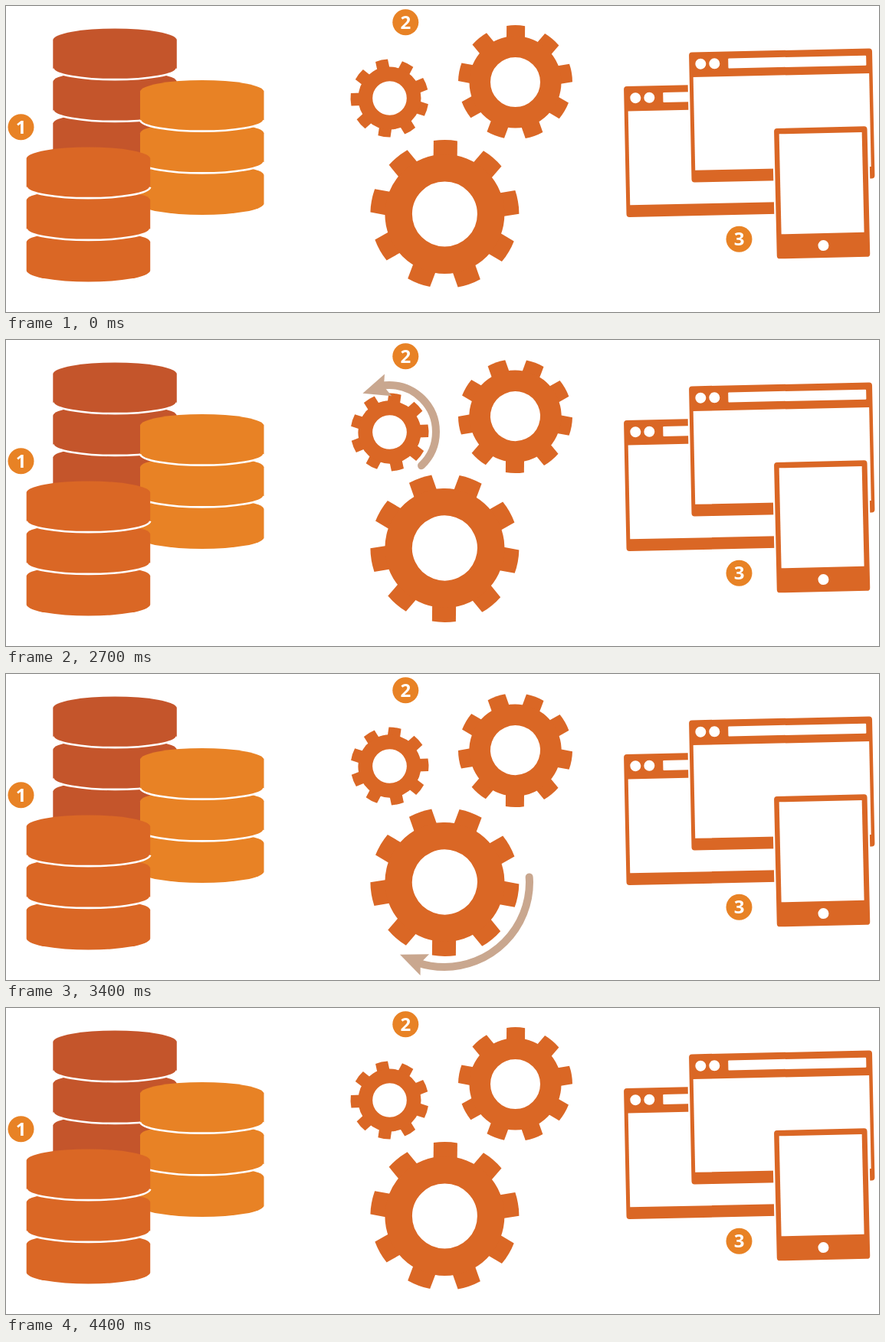
An HTML page for the animation above (5400 ms loop, 1139 px wide and 400 px high).

```html
<!DOCTYPE html>
<html lang="en">
<head>
<meta charset="utf-8">
<title>Data to screens</title>
<style>
  html, body { margin: 0; width: 100%; height: 100%; overflow: hidden; background: #fff; }
  svg { display: block; width: 100%; height: 100%; }
  text { font: bold 24px "Open Sans", "Noto Sans", sans-serif; fill: #fff; text-anchor: middle; }
  .card { stroke: #fff; stroke-width: 4.5; paint-order: stroke; }
</style>
</head>
<body>
<svg id="stage" viewBox="0 0 1139 400"></svg>
<script>
const DARK = '#c4552b', MID = '#da6725', LIGHT = '#e88225', TAN = '#c9a78f';
const LOOP = 5400, START = 2000, STEP = 100, STEPS = 24;
const stage = document.getElementById('stage');

// Three discs, drawn from the bottom up so that each covers the next one's top.
function stack(x, y, color) {
  const disc = i => {
    const top = y + i * 54.7, bottom = top + 37.7;
    const rim = `A80.8 15 0 0 0 ${x + 161.5} ${bottom}`;
    return `<path fill="${color}" d="M${x} ${top}V${bottom}${rim}V${top}A80.8 15 0 0 0 ${x} ${top}Z"/>` +
      (i < 2 ? `<path fill="none" stroke="#fff" stroke-width="2.6" d="M${x} ${bottom}${rim}"/>` : '');
  };
  return [2, 1, 0].map(disc).join('');
}

// Nine straight-sided teeth on a ring.
function gear({ x, y, hole, body, outer, tooth, turn }) {
  const half = tooth / 2, reach = Math.sqrt(outer * outer - half * half);
  const cog = `M${-half} ${-body + 5}V${-reach}A${outer} ${outer} 0 0 1 ${half} ${-reach}V${-body + 5}Z`;
  let teeth = '';
  for (let i = 0; i < 9; i++) teeth += `<path d="${cog}" transform="rotate(${turn + i * 40})"/>`;
  return `<g transform="translate(${x} ${y})"><g class="gear" fill="${MID}">${teeth}` +
    `<circle r="${(hole + body) / 2}" fill="none" stroke="${MID}" stroke-width="${body - hole}"/></g></g>`;
}

const box = (x, y, w, h, r, fill, cls = '') =>
  `<rect class="${cls}" x="${x}" y="${y}" width="${w}" height="${h}" rx="${r}" fill="${fill}"/>`;
const dot = (x, y, r, fill) => `<circle cx="${x}" cy="${y}" r="${r}" fill="${fill}"/>`;
const badge = (x, y, label) => dot(x, y, 17, LIGHT) + `<text x="${x}" y="${y + 8.7}">${label}</text>`;

const browser = (x, y, h) => `<g transform="translate(${x} ${y}) rotate(-1.2)">` +
  box(0, 0, 239, h, 4, MID, 'card') + box(5, 32.5, 229.5, h - 48, 0, '#fff') +
  dot(15, 15.5, 7, '#fff') + dot(33, 15.5, 7, '#fff') + box(51, 9, 180, 13, 1, '#fff') + '</g>';

const tablet = (x, y) => `<g transform="translate(${x} ${y}) rotate(-1.3)">` +
  box(0, 0, 121.5, 170.5, 4, MID, 'card') + box(6.5, 7.5, 108, 131, 0, '#fff') +
  dot(61, 154.5, 7, '#fff') + '</g>';

// The route loops round the small gear, then the big one, and leaves to the right.
const ROUTE = 'M153 181H500A61 61 0 0 0 500 59A61 61 0 0 0 500 181A61 61 0 0 0 525.4 174' +
  'A111 111 0 0 1 683 272A111 111 0 0 1 572 383A111 111 0 0 1 461 272' +
  'A111 111 0 0 1 572 161A111 111 0 0 1 624 174A82 82 0 0 0 664 181H900';

stage.innerHTML =
  stack(61.3, 44, DARK) + stack(175, 111.5, LIGHT) + stack(26.7, 199, MID) +
  gear({ x: 500.5, y: 120.5, hole: 22.3, body: 41, outer: 51, tooth: 16.3, turn: -12 }) +
  gear({ x: 664.5, y: 99.6, hole: 32.5, body: 60, outer: 74.5, tooth: 24, turn: 0.5 }) +
  gear({ x: 572.4, y: 272, hole: 42.5, body: 78, outer: 97, tooth: 31, turn: 0.6 }) +
  browser(806, 105, 171) + browser(891, 60.5, 170) + tablet(1002, 160) +
  badge(19.5, 158.3, 1) + badge(521.3, 21.3, 2) + badge(956.5, 304.7, 3) +
  `<g id="arrow"><path id="route" fill="none" stroke="${TAN}" stroke-width="10" stroke-linecap="round" d="${ROUTE}"/>` +
  `<path id="head" fill="${TAN}" d="M0 0L-35 15L-29 0L-35 -15Z"/></g>`;

const [arrow, route, head] = ['arrow', 'route', 'head'].map(id => document.getElementById(id));
const gears = stage.querySelectorAll('.gear');

// Distance along the route at given steps.
const TAIL = [[0, 0], [4, 182], [5, 235], [9, 558], [14, 969], [18, 1309], [23, 1715]];
const TIP = [[0, 71], [4, 328], [9, 752], [14, 1212], [18, 1510], [23, 1802]];

function smooth(keys, k) {
  const slope = i => {
    const a = keys[Math.max(i - 1, 0)], b = keys[Math.min(i + 1, keys.length - 1)];
    return (b[1] - a[1]) / (b[0] - a[0]);
  };
  let i = 0;
  while (i < keys.length - 2 && k >= keys[i + 1][0]) i++;
  const [k0, v0] = keys[i], [k1, v1] = keys[i + 1];
  const d = k1 - k0, u = (k - k0) / d, w = 1 - u;
  return v0 * w * w * (1 + 2 * u) + v1 * u * u * (3 - 2 * u) +
    d * u * w * (slope(i) * w - slope(i + 1) * u);
}

function draw(time) {
  const k = Math.floor((time % LOOP - START) / STEP);
  const moving = k >= 0 && k < STEPS;
  // Gears flip by half a tooth every five steps.
  const flipped = moving && Math.floor((k + 1) / 5) % 2 === 1;
  gears.forEach(g => g.setAttribute('transform', `rotate(${flipped ? 20 : 0})`));

  arrow.setAttribute('visibility', moving ? 'visible' : 'hidden');
  if (!moving) return;
  const tail = smooth(TAIL, k), tip = smooth(TIP, k);
  route.setAttribute('stroke-dasharray', `${tip - 26 - tail} 9999`);
  route.setAttribute('stroke-dashoffset', -tail);
  const p = route.getPointAtLength(tip), q = route.getPointAtLength(tip - 35);
  const angle = Math.atan2(p.y - q.y, p.x - q.x) * 180 / Math.PI;
  head.setAttribute('transform', `translate(${p.x} ${p.y}) rotate(${angle})`);
}

const begin = performance.now();
function tick() {
  draw(performance.now() - begin);
  requestAnimationFrame(tick);
}
tick();
</script>
</body>
</html>
```
